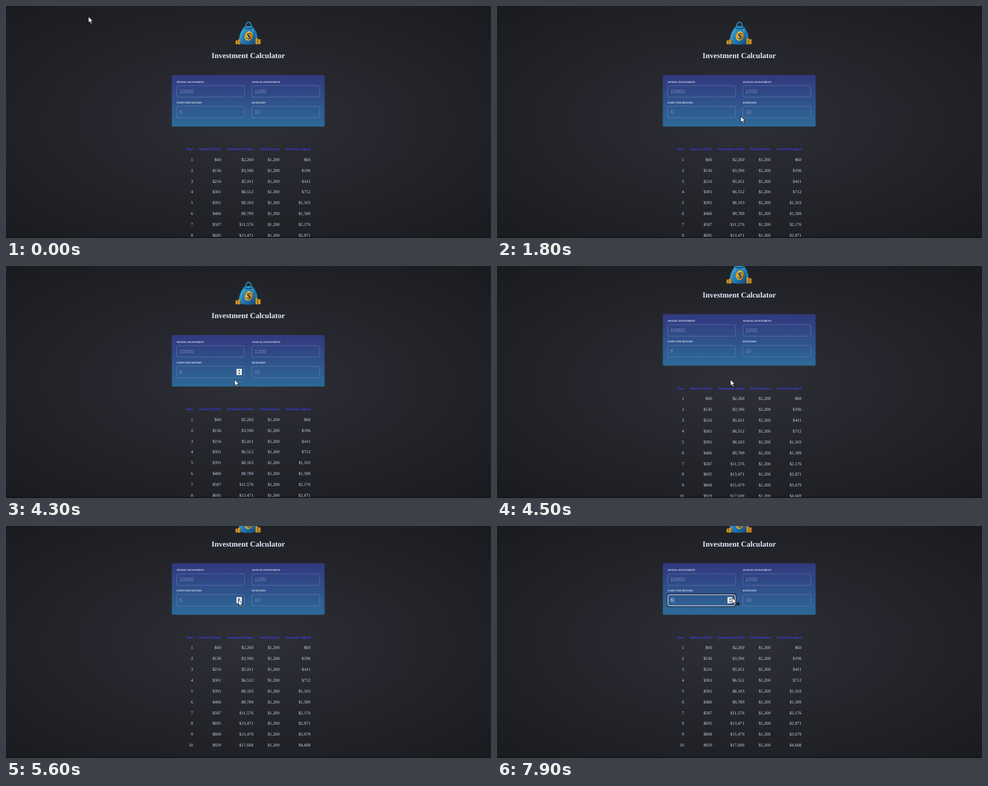
These frames come from a looping animation (800x383 px, 8 s). An HTML page:

```html
<!DOCTYPE html>
<html lang="en">
<head>
<meta charset="utf-8">
<title>Investment Calculator</title>
<style>
  html, body { margin: 0; height: 100%; overflow: hidden; background: #1b1c20; }
  body { background: radial-gradient(#2e2f37, #1a1b1f); }
  svg { display: block; width: 100vw; height: 100vh; text-rendering: geometricPrecision; }
  text { font-family: "Liberation Serif", "Times New Roman", serif; }
  .title { font-size: 12.63px; font-weight: bold; fill: #e4e9fa; text-anchor: middle; }
  .label { font-size: 4.2px; font-weight: bold; fill: #eef1fb; }
  .head { font-size: 5.82px; font-weight: bold; fill: #3b3eee; text-anchor: end; }
  .cell { font-size: 7.2px; fill: #cfd6f2; text-anchor: end; }
  .value { font: 8.6px "Liberation Sans", Arial, sans-serif; fill: #a3aecb; fill-opacity: .65; }
  .value.typed { fill: #e6ebf6; fill-opacity: 1; }
  .box { fill: none; stroke: #8a97c8; stroke-opacity: .5; stroke-width: .8; }
</style>
</head>
<body>
<svg viewBox="0 0 800 383" preserveAspectRatio="none">
  <defs>
    <linearGradient id="panel" x2="0" y2="1">
      <stop stop-color="#32387e"/><stop offset="1" stop-color="#2d6a98"/>
    </linearGradient>
    <linearGradient id="bag" x2="1" y2="1">
      <stop stop-color="#36a9d8"/><stop offset=".55" stop-color="#1f78b0"/><stop offset="1" stop-color="#123f70"/>
    </linearGradient>
    <linearGradient id="gold" x2="1">
      <stop stop-color="#d98a17"/><stop offset=".4" stop-color="#f8c640"/><stop offset="1" stop-color="#a9610d"/>
    </linearGradient>
  </defs>

  <g id="page">
    <g id="art">
      <path d="M395 38C394 23 406 23 405 38" fill="none" stroke="#2a7fae" stroke-width="2"/>
      <path d="M392 35Q400 31 408 35L413 43Q417 55 415 62Q400 66 385 62Q382 53 388 42Z" fill="url(#bag)"/>
      <path d="M390 40Q386 50 387 59M395 36L392 44M405 36L408 43M412 46Q414 54 412 60" fill="none" stroke="#65cdec" stroke-width=".8" opacity=".75"/>
      <path d="M393 36Q400 39 407 36" fill="none" stroke="#0d3358" stroke-width="1.2"/>
      <ellipse cx="400.5" cy="49.5" rx="6.8" ry="8" fill="url(#gold)" transform="rotate(18 400.5 49.5)"/>
      <text x="400.6" y="54.7" text-anchor="middle" font-size="15" font-weight="bold" fill="#173855" transform="rotate(12 400.5 49.5)">$</text>
    </g>
    <text class="title" x="399.6" y="86.3">Investment Calculator</text>

    <rect x="273.5" y="114" width="252" height="85" rx="2.6" fill="url(#panel)"/>
    <g id="fields"></g>
    <g id="focus" fill="none">
      <rect x="280.7" y="164.7" width="113.4" height="20.6" rx="3.2" stroke="#101322" stroke-width="1.2"/>
      <rect x="281.8" y="165.8" width="111.2" height="18.4" rx="2.4" stroke="#f2f4fa" stroke-width="1"/>
      <path d="M291.6 170.6V179.4" stroke="#dfe6f4" stroke-width=".5"/>
    </g>
    <g id="spin">
      <rect x="380.2" y="169.8" width="8.8" height="10.2" fill="#f2f2f2"/>
      <path d="M382.3 173.8L384.6 171.2L386.9 173.8ZM382.3 176.2L384.6 178.8L386.9 176.2Z" fill="#55585c"/>
    </g>
    <g id="table"></g>
  </g>

  <rect y="381" width="800" height="2" fill="#101114" opacity=".55"/>
  <g id="cursor">
    <path d="M0 0V10.2L2.4 8L4.2 12L6 11.2L4.2 7.4H7.4Z" fill="#fff" stroke="#08090c" stroke-width=".8" stroke-linejoin="round"/>
    <path id="press" d="M6.2 8.8L8 10.6M9 8.2H11.6Q12.6 10.4 11 12H8.4Z" fill="#20242e" stroke="#0b0d12" stroke-width=".8"/>
  </g>
</svg>

<script>
const LOOP = 8000, STEP = 100;
const $ = id => document.getElementById(id);

function add(parent, tag, attrs, text = '') {
  const el = document.createElementNS('http://www.w3.org/2000/svg', tag);
  for (const key in attrs) el.setAttribute(key, attrs[key]);
  el.textContent = text;
  return parent.appendChild(el);
}

// Coin stacks: x, base, number of coins
[[378.5, 63, 3], [382.3, 63.3, 4], [411.3, 63.2, 5], [415.7, 63, 4]].forEach(([x, base, count]) => {
  for (let i = 0; i < count; i++) {
    add($('art'), 'rect', {
      x, y: base - 2 * (i + 1), width: 4.6, height: 2, rx: .7,
      fill: 'url(#gold)', stroke: '#6e450f', 'stroke-width': .3
    });
  }
});

function field(x, y, label, hint) {
  add($('fields'), 'text', { class: 'label', x, y: y - 4.9 }, label);
  add($('fields'), 'rect', { class: 'box', x, y, width: 111.8, height: 19, rx: 2.5 });
  return add($('fields'), 'text', { class: 'value', x: x + 4.5, y: y + 12.4 }, hint);
}
field(281.6, 131.4, 'INITIAL INVESTMENT', '10000');
field(405.6, 131.4, 'ANNUAL INVESTMENT', '1200');
const returnText = field(281.6, 165.5, 'EXPECTED RETURN', '6');
field(405.6, 165.5, 'DURATION', '10');

const heads = ['Year', 'Interest (Year)', 'Investment Value', 'Total Interest', 'Invested Capital'];
const edges = [308.6, 354.8, 408, 451.2, 502.2];
heads.forEach((name, i) => add($('table'), 'text', { class: 'head', x: edges[i], y: 238.2 }, name));
const rows = Array.from({ length: 10 }, (_, r) =>
  edges.map(x => add($('table'), 'text', { class: 'cell', x, y: 255.9 + r * 17.85 })));

const money = n => '$' + Math.round(n).toLocaleString('en-US');

function fillTable(rate) {
  let value = 1000, total = 0;
  rows.forEach((cells, r) => {
    const interest = value * rate / 100;
    value += interest + 1200;
    total += interest;
    [r + 1, money(interest), money(value), money(1200), money(total)]
      .forEach((text, i) => cells[i].textContent = text);
  });
}

// Tracks: time followed by coordinates
const path = [
  [0, 136, 17.5], [200, 158, 36], [600, 310, 158], [900, 396, 205], [1300, 405, 187],
  [1700, 402, 182], [2700, 402, 182], [3200, 400, 186], [3700, 388, 173], [4200, 383, 175],
  [4300, 377, 187.5], [4500, 385, 187.5], [5000, 385, 164], [5300, 384, 124],
  [5600, 383.5, 121.5], [6000, 387, 119], [6400, 388, 118.3], [8000, 388, 118.3]
];
const scroll = [[0, 0], [4300, 0], [4400, 15], [4500, 34.4], [4600, 45], [4800, 51], [5100, 52.4], [8000, 52.4]];
const clicks = [6100, 6500, 6900, 7200, 7500, 7800];

function at(track, t) {
  const i = Math.max(1, track.findIndex(p => p[0] >= t));
  const a = track[i - 1], b = track[i];
  const k = (t - a[0]) / (b[0] - a[0]);
  return a.slice(1).map((v, j) => v + (b[j + 1] - v) * k);
}

const show = (id, on) => $(id).setAttribute('visibility', on ? 'visible' : 'hidden');
let shown = -1;

function draw(now) {
  const t = Math.floor(now % LOOP / STEP) * STEP;
  const typed = clicks.filter(c => c <= t).length;
  if (typed !== shown) {
    shown = typed;
    fillTable(typed || 6);
    returnText.textContent = typed || 6;
    returnText.classList.toggle('typed', typed > 0);
  }
  $('page').setAttribute('transform', `translate(0 ${-at(scroll, t)[0]})`);
  $('cursor').setAttribute('transform', `translate(${at(path, t)})`);
  show('focus', typed > 0);
  show('spin', t >= 3600 && t < 4400 || t >= 5200);
  show('press', t >= 7800);
}

function tick() {
  draw(performance.now());
  requestAnimationFrame(tick);
}
tick();
</script>
</body>
</html>
```
